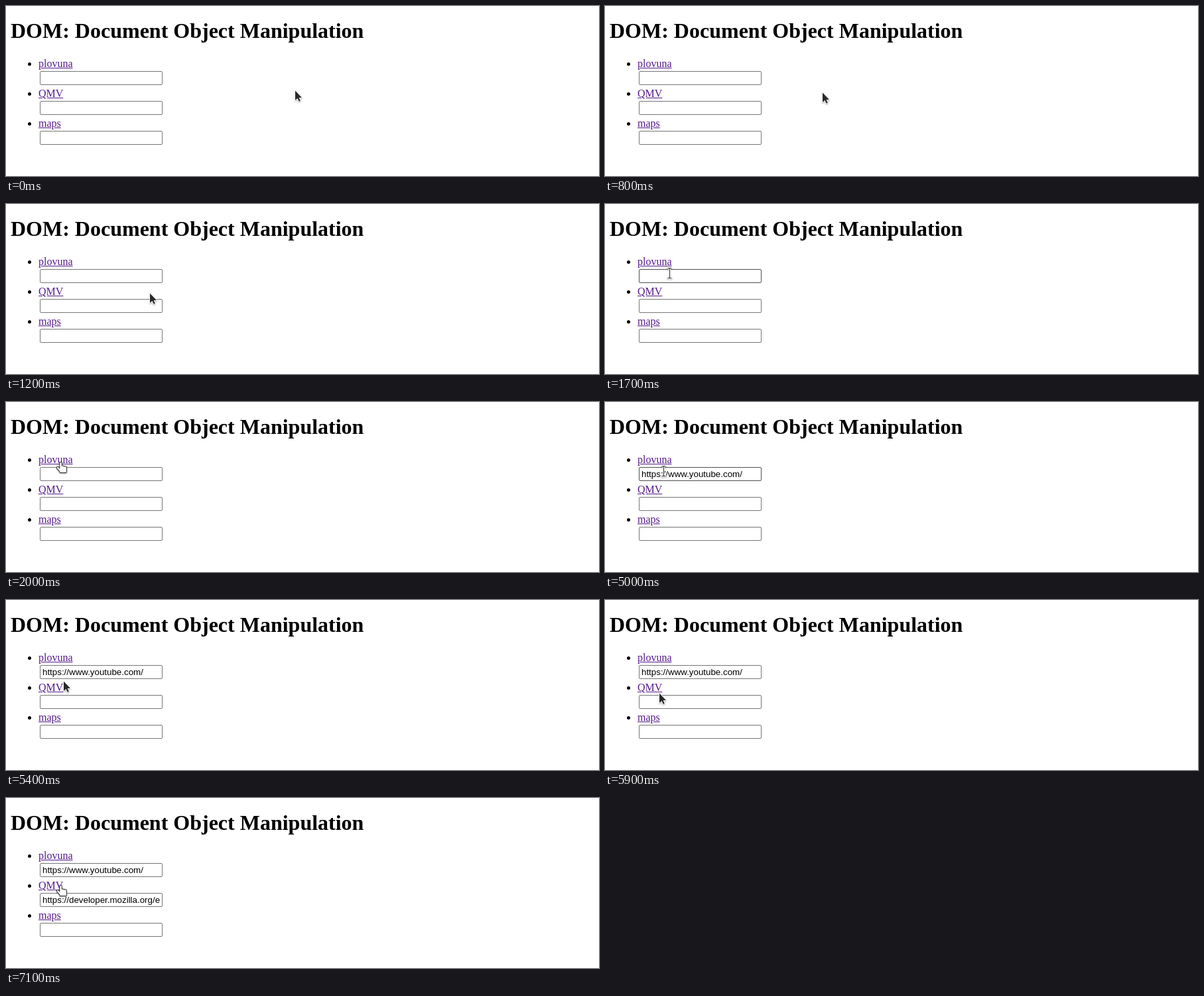
Recreate the animation shown at these times as an HTML page with a canvas. Size 894 by 256 pixels, loop 8 s.

```html
<!DOCTYPE html>
<html lang="en">
<head>
<meta charset="utf-8">
<title>DOM: Document Object Manipulation</title>
<style>
  html, body { margin: 0; width: 100%; height: 100%; overflow: hidden; background: #fff; }
  body { position: relative; color: #000; font-family: "Liberation Serif", "Times New Roman", serif; }
  h1, ul, li, a, i, .field, canvas { position: absolute; margin: 0; padding: 0; }
  h1 { left: 7px; top: 19px; font-size: 32px; line-height: 36px; font-weight: bold; white-space: nowrap; }
  ul { left: 0; top: 78px; list-style: none; }
  li { left: 0; font-size: 16px; line-height: 18px; white-space: nowrap; }
  i { left: 33px; top: 7px; width: 5px; height: 5px; border-radius: 50%; background: #000; }
  a { left: 49px; top: 0; color: #551a8b; text-decoration: underline; }
  a.active { color: #e00; }
  .field {
    left: 51px; top: 20px; width: 185px; height: 21px; box-sizing: border-box;
    padding: 2px 3px; border: 1px solid #767676; border-radius: 2px; background: #fff;
    font: 13.3333px/15px "Liberation Sans", Arial, sans-serif;
  }
  .field.hover { border-color: #4f4f4f; }
  .field span { display: block; width: 177px; height: 15px; overflow: hidden; }
  canvas { left: 0; top: 0; }
</style>
</head>
<body>
<h1>DOM: Document Object Manipulation</h1>
<ul></ul>
<canvas width="894" height="256"></canvas>
<script>
const LOOP = 8000, STEP = 100, PITCH = 45;

const items = [
  { label: "plovuna", url: "https://www.youtube.com/", press: 3600 },
  { label: "QMV", url: "https://developer.mozilla.org/en-US/", press: 7000 },
  { label: "maps", url: "", press: Infinity }
];

// Each glide takes the pointer from where it rests to a new place.
const home = { x: 435, y: 127 };
const glides = [
  { from: 300, to: 1200, x: 216, y: 134 },
  { from: 1200, to: 1700, x: 97, y: 104 },
  { from: 1700, to: 2000, x: 82, y: 90 },
  { from: 4900, to: 5000, x: 88, y: 104 },
  { from: 5000, to: 5800, x: 83, y: 145 },
  { from: 5800, to: 5900, x: 81, y: 140 },
  { from: 6100, to: 6400, x: 82, y: 131 }
];

const ease = k => k ** 1.2;
const clamp = k => Math.min(1, Math.max(0, k));

function pointerAt(t) {
  let { x, y } = home;
  for (const g of glides) {
    const k = ease(clamp((t - g.from) / (g.to - g.from)));
    x += (g.x - x) * k;
    y += (g.y - y) * k;
  }
  return { x: Math.round(x), y: Math.round(y) };
}

function add(parent, tag, text = "") {
  const el = document.createElement(tag);
  el.textContent = text;
  parent.append(el);
  return el;
}

const list = document.querySelector("ul");
items.forEach((item, i) => {
  const row = add(list, "li");
  row.style.top = i * PITCH + "px";
  add(row, "i");
  item.link = add(row, "a", item.label);
  item.field = add(row, "div");
  item.field.className = "field";
  item.value = add(item.field, "span");
});

function isOver(el, p) {
  const box = el.getBoundingClientRect();
  return p.x >= box.left && p.x < box.right && p.y >= box.top && p.y < box.top + Math.min(box.height, 21) - (el.tagName === "A");
}

const ctx = document.querySelector("canvas").getContext("2d");

function stroke(shape, color, width, shaded = false) {
  ctx.shadowColor = shaded ? "rgba(0,0,0,.35)" : "transparent";
  ctx.strokeStyle = color;
  ctx.lineWidth = width;
  ctx.stroke(shape);
}

const arrow = new Path2D("M1 .5V15L4.4 12L6.8 16.7L8.9 15.7L6.6 11H11Z");
const beam = new Path2D("M-2 -7.5H3M.5 -7V7M-2 7.5H3");

// A hand of four finger strokes and a thumb
const hand = new Path2D("M-4 9L0 13.5");
for (let i = 0; i < 4; i++) {
  hand.moveTo(.5 + 2.4 * i, i ? 7 + .5 * i : 2);
  hand.lineTo(.5 + 2.4 * i, 15);
}

const cursors = {
  arrow() {
    stroke(arrow, "#fff", 2, true);
    ctx.shadowColor = "transparent";
    ctx.fill(arrow);
  },
  hand() {
    stroke(hand, "#2a2a2a", 4.4, true);
    stroke(hand, "#fff", 2.5);
  },
  beam() {
    stroke(beam, "#fff", 3, true);
    stroke(beam, "#2a2a2a", 1);
  }
};

function draw(now) {
  const t = Math.floor((now % LOOP) / STEP) * STEP;
  const p = pointerAt(t);
  let cursor = "arrow";
  for (const { press, url, link, field, value } of items) {
    const overField = isOver(field, p);
    if (overField) cursor = "beam";
    if (isOver(link, p)) cursor = "hand";
    field.classList.toggle("hover", overField);
    link.classList.toggle("active", t === press);
    value.textContent = t > press ? url : "";
  }
  ctx.clearRect(0, 0, 894, 256);
  ctx.save();
  ctx.translate(p.x, p.y);
  ctx.lineJoin = ctx.lineCap = cursor === "beam" ? "square" : "round";
  if (cursor !== "beam") ctx.lineCap = "round";
  ctx.fillStyle = "#2a2a2a";
  ctx.shadowBlur = 2;
  ctx.shadowOffsetY = 1;
  cursors[cursor]();
  ctx.restore();
}

const start = performance.now();
function tick() {
  draw(performance.now() - start);
  requestAnimationFrame(tick);
}
tick();
</script>
</body>
</html>
```
